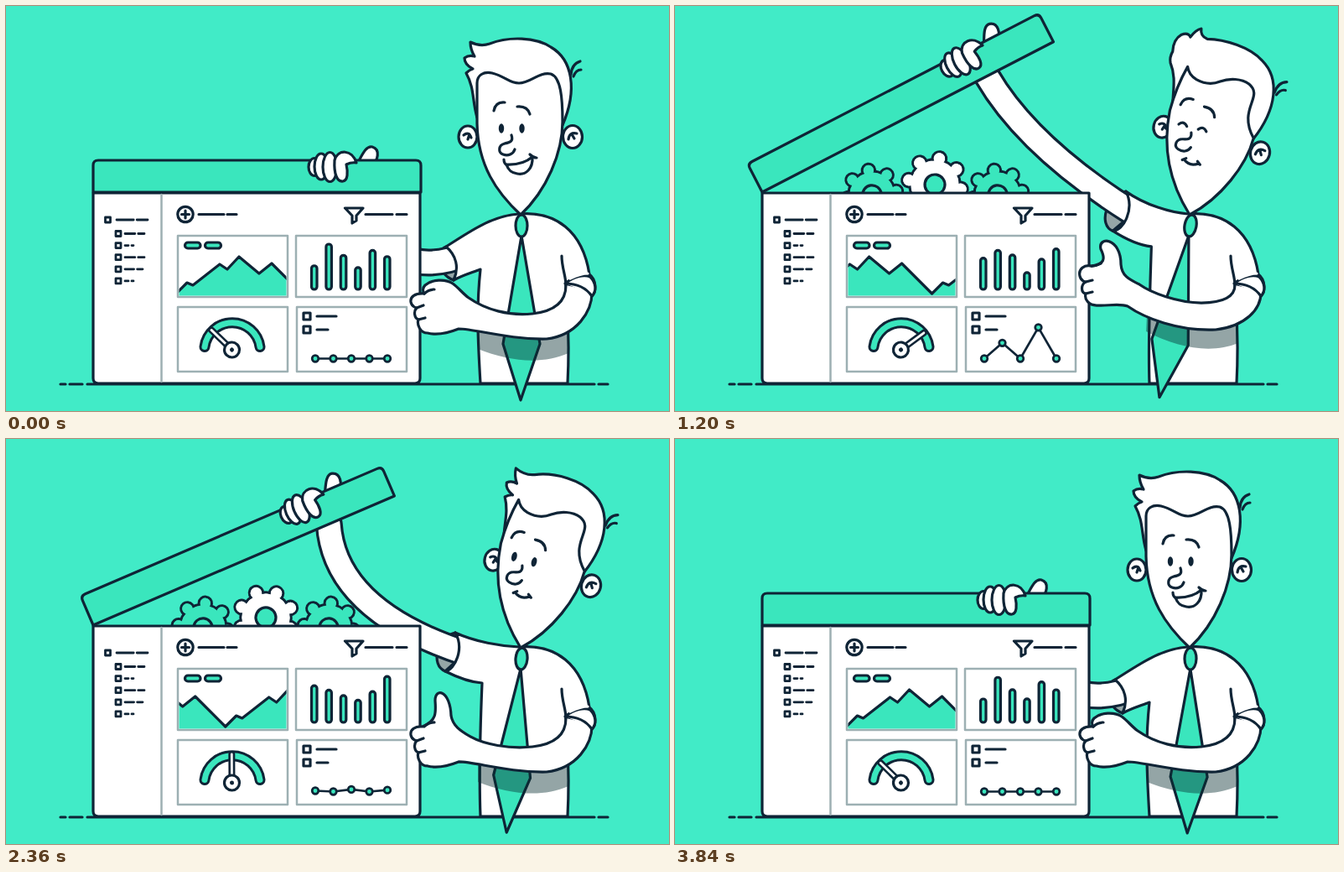
These frames come from a looping animation (791 by 483 pixels, 3.88 s). An HTML page:

```html
<!DOCTYPE html>
<html lang="en">
<head>
<meta charset="utf-8">
<title>Dashboard with a lid</title>
<style>
  html, body { margin: 0; width: 100%; height: 100%; overflow: hidden; background: #41ebc7; }
  svg { display: block; width: 791px; height: 483px; }
  svg * { stroke-linecap: round; stroke-linejoin: round; }
  #scene { fill: none; stroke: #0f2436; stroke-width: 3.2; }
  .white { fill: #fff; }
  .teal { fill: #3ae6bd; }
  .ink { fill: #0f2436; stroke: none; }
  .shade { fill: #083032; fill-opacity: .43; stroke: none; }
  .panel { stroke: #9db0b3; stroke-width: 2.5; }
</style>
</head>
<body>
<svg viewBox="0 0 791 483">
  <defs>
    <clipPath id="chartClip"><rect x="206.500" y="275.500" width="128" height="70"/></clipPath>
  </defs>
  <g id="scene">
    <path d="M65 451H71M76 451H91M97 451H702M707 451H718"/>

    <!-- raised arm, gears, lid -->
    <path id="cuffHole" fill="#95a6a7"/>
    <path id="armLine" stroke-width="33"/>
    <path id="armFill" stroke="#fff" stroke-width="26.600"/>
    <g id="gears"></g>
    <g id="lid">
      <path class="white" d="M418 190C424 180 429 166 437 168C447 171 444 184 436 192Z"/>
      <path class="teal" d="M104 222V190Q104 184 110 184H489Q495 184 495 190V222Z"/>
      <g class="white">
        <ellipse cx="368" cy="192" rx="7" ry="10.500"/>
        <ellipse cx="376" cy="191.500" rx="8" ry="15.500"/>
        <ellipse cx="386.500" cy="192" rx="8.500" ry="17.500"/>
        <path d="M418 187C413 171 396 170 392 184C391 200 395 210 402 209C408 208 408 198 406 189Q412 186 418 187Z"/>
      </g>
    </g>

    <!-- dashboard -->
    <path class="white" d="M104 223H494V444Q494 450 488 450H110Q104 450 104 444Z"/>
    <path class="panel" d="M185.500 225V448M205 274H336V347H205ZM346 274H478V347H346ZM205 359H336V436H205ZM347 359H478V436H347Z"/>
    <g id="menu"></g>
    <circle cx="214" cy="248.500" r="9.200"/>
    <path d="M209.500 248.500H218.500M214 244V253M230 248.500H260M264 248.500H275"/>
    <path d="M404.500 241H426L418 250V256L413 259V250ZM429 248.500H461M466 248.500H478"/>

    <g clip-path="url(#chartClip)"><path id="hills" class="teal"/></g>
    <rect class="teal" x="213.500" y="282" width="18.500" height="7" rx="3.500"/>
    <rect class="teal" x="237.500" y="282" width="19" height="7" rx="3.500"/>

    <g id="bars"></g>

    <path d="M237 406.500A33.300 33.300 0 0 1 303 406.500" stroke-width="13"/>
    <path d="M237 406.500A33.300 33.300 0 0 1 303 406.500" stroke="#3ae6bd" stroke-width="7"/>
    <g id="needle">
      <path d="M269.500 410V376" stroke-width="8"/>
      <path d="M269.500 410V376" stroke="#fff" stroke-width="2.800"/>
      <circle class="white" cx="269.500" cy="410" r="9"/>
      <circle class="ink" cx="269.500" cy="410" r="2.500"/>
    </g>

    <path d="M355 366H363V374H355ZM355 382H363V390H355ZM371 370H394M371 386H384"/>
    <path id="trend" stroke-width="2.700"/>
    <g id="dots" class="teal" stroke-width="2.700"></g>

    <!-- man -->
    <path id="body" class="white"/>
    <path d="M663 298C663 312 668 322 668 333"/>
    <g id="tie" class="teal">
      <path d="M615 274L593 403L614 470L637 403Z"/>
      <ellipse cx="615" cy="262" rx="7" ry="13"/>
    </g>
    <path id="armShade" class="shade"/>
    <path id="hand" class="white"/>
    <path id="fingers"/>
    <path class="white" d="M667 331C678 322 690 320 697 323C704 330 705 340 699 346C692 336 680 331 667 331Z"/>
    <path stroke="#fff" d="M673 325C682 321 688 319 694 319"/>

    <g id="head">
      <g id="earL">
        <ellipse class="white" cx="551" cy="156" rx="11" ry="13"/>
        <path d="M546 154Q552 149 555 157M553 153L551 159"/>
      </g>
      <ellipse class="white" cx="676" cy="156" rx="11.500" ry="13.500"/>
      <path d="M671 159Q672 150 681 152M675 153L678 158"/>
      <path d="M674 82Q675 69 685 66M677 84Q680 76 686 76"/>
      <path id="hair" class="white"/>
      <path id="face" class="white"/>
      <g id="features">
        <path d="M582 125Q584 114 595 115M610 120Q622 119 625 129"/>
        <g id="eyesOpen" class="ink">
          <ellipse cx="591" cy="146" rx="3.200" ry="5.700"/>
          <ellipse cx="615.500" cy="146" rx="3.200" ry="5.700"/>
        </g>
        <path id="eyesShut" d="M586 148Q591 142 596 148M610 148Q615 142 620 148"/>
        <path d="M603 154C606 162 600 163 595 164C587 166 587 175 593 177C599 179 605 177 607 171"/>
        <g id="grin">
          <path class="white" d="M597 189Q616 190 628 180C629 194 620 202 610 200C602 199 599 195 597 189Z"/>
          <path d="M594 183Q594 188 598 190M625 177Q629 181 633 181"/>
        </g>
        <path id="smile" d="M603 187Q612 194 621 187M601 188L605 185M619 185L623 188"/>
      </g>
    </g>
  </g>
</svg>
<script>
const LOOP = 3880;
const $ = id => document.getElementById(id);
const set = (id, attr, value) => $(id).setAttribute(attr, value);
const add = (parent, tag, attrs) => {
  const el = document.createElementNS('http://www.w3.org/2000/svg', tag);
  for (const name in attrs) el.setAttribute(name, attrs[name]);
  return $(parent).appendChild(el);
};
const lerp = (a, b, p) => a + (b - a) * p;

// Smooth 0 to 1 between two times.
const ease = (t, from, to) => {
  const u = Math.min(1, Math.max(0, (t - from) / (to - from)));
  return u * u * (3 - 2 * u);
};
// Rises during one span of time and falls back during another.
const hold = (t, a, b, c, d) => ease(t, a, b) - ease(t, c, d);
// Damped swing that begins at a given time.
const wobble = (t, start, period = 560, decay = 180) => {
  const dt = Math.max(0, t - start);
  return Math.exp(-dt / decay) * Math.sin(2 * Math.PI * dt / period);
};

// Blends two paths that share the same commands.
function mix(a, b, p) {
  const to = b.match(/-?[\d.]+/g);
  let i = 0;
  return a.replace(/-?[\d.]+/g, n => lerp(+n, +to[i++], p).toFixed(2));
}

const HAIR_END = 'C600 36 632 37 650 49C676 64 682 100 664 142';
const HAIR = [
  'M562 133C556 112 559 98 549 80Q553 76 557 75Q547 70 547 62Q552 58 559 60Q554 52 554 43Q566 49 577 45' + HAIR_END,
  'M562 133C556 112 557 96 545 80Q542 74 544 66Q541 52 549 44Q556 39 560 44Q564 34 570 31Q571 40 580 41' + HAIR_END
];
const FACE = [
  'M614 249C585 222 563 190 562 140C562 124 562 108 562 92C562 82 570 78 580 80C596 84 600 92 612 92C626 92 636 78 650 81C662 85 664 110 664 138C664 175 645 220 614 249Z',
  'M614 249C585 222 562 185 559 135C559 118 561 98 566 79C568 84 573 89 580 91C592 94 600 92 608 86C618 79 632 76 642 80C664 90 636 112 664 141C664 175 645 220 614 249Z'
];
const BODY_START = 'M612 248C655 244 688 268 696 320C704 326 705 340 699 346L668 333C671 370 672 410 670 450L566 450';
const BODY = [
  BODY_START + 'C563 400 561 360 566 314C556 318 545 321 534 327C541 312 537 297 525 287C555 268 580 250 612 248Z',
  BODY_START + 'C564 400 566 340 568 291C552 290 538 284 524 277C536 275 547 250 536 231C560 242 590 247 612 248Z'
];
const CUFF = [
  'M525 287C512 292 514 320 534 327L546 306Z',
  'M536 231C514 236 506 270 524 277L548 255Z'
];
const HAND_END = 'C488 342 482 347 483 353C484 359 490 360 490 360C486 364 487 372 492 374C490 380 494 390 503 390C515 393 530 389 540 385C560 385 600 398 645 397C680 393 700 365 699 340';
const HAND = {
  fist: 'M668 333C668 352 655 364 628 367C600 370 572 362 552 348C545 343 540 336 533 331C524 325 508 326 500 333C497 336 497 340 499 343' + HAND_END,
  thumb: 'M668 333C668 352 655 364 628 367C600 370 570 364 554 355C542 348 533 342 531 330C530 300 512 296 512 312C513 326 514 336 497 343' + HAND_END,
  lifted: 'M668 333C668 346 655 354 628 354C600 354 568 342 554 332C542 326 533 322 532 308C532 276 504 274 508 290C514 302 512 308 497 310C488 308 481 314 483 322C484 328 490 329 490 329C484 332 484 342 490 343C488 350 494 357 503 357C515 358 530 354 540 358C560 372 600 388 645 386C680 382 700 362 699 340'
};
const FINGERS = [
  'M490 360L498 357M492 374L500 372M499 343C502 340 506 338 511 338',
  'M490 329L498 327M490 343L498 341M497 310C500 310 504 309 508 307'
];
const SHADE = [
  'M563 386C600 397 650 402 672 390L671 414C640 428 600 424 563 409Z',
  'M563 368C600 386 650 392 672 380L672 402C640 415 600 408 562 388Z'
];

// Sidebar: a square and a broken line per row.
[37, 23, 10, 23, 21, 10].forEach((length, i) => {
  const x = i ? 142 : 132, y = i ? 257.4 + 14.1 * i : 255;
  add('menu', 'path', {
    d: `M${x - (i ? 11 : 13.5)} ${y - 3}h6v6h-6ZM${x} ${y}h${length * .6 - 2}m4 0H${x + length}`,
    'stroke-width': 2.8
  });
});

// One period of the skyline is 150 wide.
const PEAKS = 'l13 -13 7 3 32 -25 9 6 14 -15 24 20 15 -12 36 36';
set('hills', 'd', `M203 343${PEAKS.repeat(3)}V370H203Z`);

// Bars swing around these tops, each shifted by some eighths of a turn.
const BAR_TOP = [302, 292, 303, 310, 295, 291], BAR_SHIFT = [.3, 4, 3, -1.7, -2.6, .3];
const bars = BAR_TOP.map((_, i) => add('bars', 'rect', { class: 'teal', x: 364.5 + 17.4 * i, width: 6.5, rx: 3.2 }));

const dots = [...Array(5).keys()].map(i => add('dots', 'circle', { cx: 369 + 21.5 * i, r: 3.8 }));

function makeGear(x, y, scale, color, start) {
  const wheel = add('gears', 'g', { id: 'gear' + x });
  for (const style of [{ fill: color }, { fill: color, stroke: 'none' }]) {
    const inset = style.stroke ? 1.4 : 0;
    const circle = (cx, cy, r) => add(wheel.id, 'circle', { cx, cy, r: r * scale - inset, ...style });
    circle(0, 0, 30);
    for (let a = 0; a < 2 * Math.PI; a += Math.PI / 4) {
      circle(31.5 * scale * Math.sin(a), -31.5 * scale * Math.cos(a), 8.2);
    }
  }
  add(wheel.id, 'circle', { r: 12 * scale, class: 'teal' });
  return turn => wheel.setAttribute('transform', `translate(${x} ${y}) rotate(${start + turn})`);
}
const gears = [
  makeGear(235, 225, .93, '#3ae6bd', -8),
  makeGear(385, 225, .93, '#3ae6bd', -8),
  makeGear(310, 213, 1, '#fff', 10)
];

function drawDashboard(t) {
  set('hills', 'transform', `translate(${-150 * t / LOOP} 0)`);

  const beat = 2 * Math.PI * 4 * t / LOOP;
  bars.forEach((bar, i) => {
    const top = BAR_TOP[i] + 8 * Math.cos(beat + BAR_SHIFT[i] * Math.PI / 4);
    bar.setAttribute('y', top);
    bar.setAttribute('height', 338 - top);
  });

  set('needle', 'transform', `rotate(${11.5 - 57.5 * Math.cos(beat / 2)} 269.5 410)`);

  // The odd dots rise in the first half, the even ones in the second.
  const half = t < LOOP / 2, amount = hold(t % (LOOP / 2), 250, 1250, 1300, 1860);
  const points = dots.map((dot, i) => {
    const height = half ? (i % 2) * (9.5 + 9.3 * i) : (i % 2 ? 0 : [13, 33, 23][i / 2]);
    const y = 420.5 - height * amount;
    dot.setAttribute('cy', y);
    return `${dot.getAttribute('cx')} ${y}`;
  });
  set('trend', 'd', 'M' + points.join('L'));
}

function drawLid(t) {
  const angle = 23.2 * hold(t, 740, 1170, 2830, 3330) + 8.2 * wobble(t, 1080);
  const open = angle / 23.2, beyond = Math.max(0, open - 1);
  const rad = angle * Math.PI / 180;
  set('lid', 'transform', `rotate(${-angle} 104 222)`);
  set('gears', 'transform', `translate(0 ${62 - 62 * hold(t, 640, 1000, 2850, 3250)})`);
  gears.forEach(turn => turn((1200 - t) * 180 / 1720));

  const grip = lerp(330, 306, open);
  const x = 104 + grip * Math.cos(rad), y = 222 - grip * Math.sin(rad);
  const elbow = `${lerp(450, 392, open) + 230 * beyond} ${lerp(335, 205, open) - 70 * beyond}`;
  const arm = `M${x} ${y}Q${elbow} 550 ${lerp(296, 256, open)}`;
  set('armLine', 'd', arm);
  set('armFill', 'd', arm);
  set('cuffHole', 'd', mix(...CUFF, open));
  set('body', 'd', mix(...BODY, open));
}

function drawMan(t) {
  const lift = 2 * wobble(t, 1080);
  set('hand', 'd', mix(mix(HAND.fist, HAND.thumb, hold(t, 980, 1180, 3000, 3260)), HAND.lifted, lift));
  set('fingers', 'd', mix(...FINGERS, lift));
  set('armShade', 'd', mix(...SHADE, lift));

  // Two turns to the right with a look back in between; tie and hair follow.
  const turned = hold(t, 750, 1140, 2940, 3280) - .67 * hold(t, 1500, 1720, 1780, 1980);
  const sway = start => wobble(t, start, 1400, 400);
  set('tie', 'transform', `rotate(${24 * sway(850) + 12.7 * sway(1950) - 8 * sway(2900)} 615 262)`);
  set('head', 'transform', `rotate(${15 * turned} 614 249)`);
  set('earL', 'transform', `translate(${5 * turned} 0)`);
  set('features', 'transform', `translate(${-12.5 * turned} 0)`);
  set('face', 'd', mix(...FACE, turned));
  set('hair', 'd', mix(...HAIR, 2 * wobble(t, 1080) + .8 * wobble(t, 1900)));

  const show = (id, on) => set(id, 'visibility', on ? 'visible' : 'hidden');
  const shut = t >= 1000 && t < 2040, calm = t >= 1000 && t < 2640;
  show('eyesShut', shut);
  show('eyesOpen', !shut);
  show('smile', calm);
  show('grin', !calm);
}

const start = performance.now();
function frame() {
  const t = (performance.now() - start) % LOOP;
  drawDashboard(t);
  drawLid(t);
  drawMan(t);
  requestAnimationFrame(frame);
}
frame();
</script>
</body>
</html>
```
